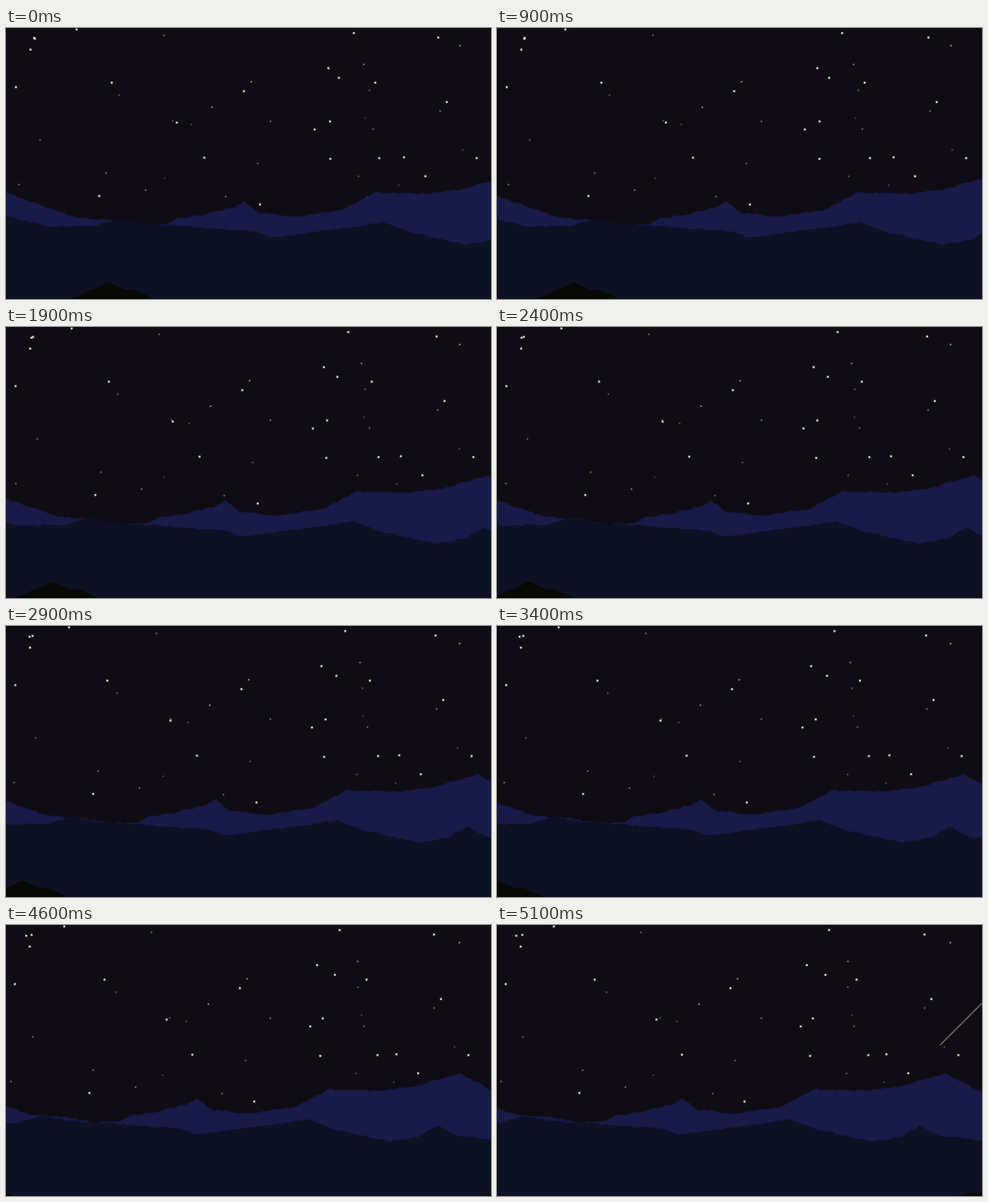
Recreate the animation shown at these times as an HTML page with a canvas. Size 600x336 px, loop 5.2 s.

```html
<!DOCTYPE html>
<html lang="en">
<head>
<meta charset="utf-8">
<title>Night sky</title>
<style>
  html, body { margin: 0; width: 100%; height: 100%; overflow: hidden; background: #100c14; }
  canvas { display: block; }
</style>
</head>
<body>
<canvas id="sky" width="600" height="336"></canvas>
<script>
const W = 600, H = 336, LOOP = 5200, STEP = 100, SPAN = LOOP - STEP;
const ctx = document.getElementById('sky').getContext('2d');

// Repeatable noise from 0 to 1.
const noise = n => {
  const v = Math.sin(n * 127.1) * 43758.5453;
  return v - Math.floor(v);
};

// The brightest stars: x, y and leftward drift over one loop.
const brightStars = [
  [35.5, 13, 12], [34.5, 12, 3.5], [30, 26.5, 1], [87, 1.5, 17], [430, 6, 19.5],
  [534.5, 11.5, 6], [130.5, 67.5, 10], [12, 73, 1.5], [294, 78, 5.5], [545, 91.5, 8],
  [398.5, 49.5, 15.5], [411.5, 61.5, 5.5], [456.5, 67.5, 12], [400.5, 115.5, 10],
  [211, 117, 14], [381.5, 125.5, 6], [245, 160.5, 16.5], [401, 162, 14],
  [461.5, 161, 2.5], [492, 160, 10.5], [582, 161, 11.5], [518.5, 183.5, 10],
  [115, 208, 13.5], [314, 218.5, 8]
].map(([x, y, drift]) => ({ x, y, drift, size: 2, alpha: 0.85 }));

const faintStars = Array.from({ length: 24 }, (_, i) => ({
  x: noise(i + 1) * W,
  y: noise(i + 40) * 235,
  drift: noise(i + 80) * 18,
  size: 1.4,
  alpha: 0.2 + noise(i + 120) * 0.4
}));

const stars = brightStars.concat(faintStars);

// Key points of each ridge, far to near; shift is the scroll over one loop.
const ridges = [
  { color: '#181a48', shift: 65, points: [
    [0, 204], [45, 221], [86, 235], [130, 238], [163, 245], [200, 243], [212, 236],
    [245, 232], [283, 222], [294, 215], [312, 229], [360, 234], [415, 226], [456, 204],
    [523, 206], [565, 200], [619, 184], [670, 210]
  ] },
  { color: '#0e1123', shift: 105, points: [
    [0, 233], [50, 246], [110, 246], [138, 237], [170, 243], [310, 253], [330, 260],
    [430, 247], [467, 241], [495, 252], [567, 269], [605, 263], [628, 249], [650, 261],
    [715, 270]
  ] },
  { color: '#080805', shift: 193, points: [
    [78, 337], [112, 323], [127, 316], [145, 324], [163, 327], [195, 342],
    [750, 342], [775, 333], [800, 332]
  ] }
];

// Breaks each slope into short, slightly rough pieces.
function roughen(points) {
  const line = [points[0]];
  for (let i = 1; i < points.length; i++) {
    const [x0, y0] = points[i - 1], [x1, y1] = points[i];
    const parts = Math.ceil((x1 - x0) / 5);
    for (let k = 1; k <= parts; k++) {
      const f = k / parts, x = x0 + (x1 - x0) * f;
      const bump = k < parts ? (noise(x) - 0.5) * 2.2 : 0;
      line.push([x, y0 + (y1 - y0) * f + bump]);
    }
  }
  return line;
}
ridges.forEach(r => { r.line = roughen(r.points); });

function drawStar({ x, y, drift, size, alpha }, progress) {
  const cx = x - drift * progress + 0.3, cy = y + 0.3;
  const square = (side, opacity) => {
    ctx.globalAlpha = opacity;
    ctx.fillRect(cx - side / 2, cy - side / 2, side, side);
  };
  square(size + 1.2, alpha * 0.3);
  square(size, alpha);
  ctx.globalAlpha = 1;
}

function drawMeteor(t) {
  const ahead = (SPAN - t) * 0.75, length = 75;
  const x = 548 + ahead, y = 149 - ahead;
  ctx.strokeStyle = 'rgba(255,255,255,0.4)';
  ctx.lineWidth = 1.5;
  ctx.beginPath();
  ctx.moveTo(x, y);
  ctx.lineTo(x + length, y - length);
  ctx.stroke();
}

function drawRidge({ color, shift, line }, progress) {
  const offset = shift * progress;
  const first = line[0][0] - offset, last = line[line.length - 1][0] - offset;
  ctx.beginPath();
  ctx.moveTo(first, H + 20);
  for (const [x, y] of line) ctx.lineTo(x - offset, y);
  ctx.lineTo(last, H + 20);
  ctx.fillStyle = ctx.strokeStyle = color;
  ctx.fill();
  // A faint outline softens the edge.
  ctx.globalAlpha = 0.4;
  ctx.lineWidth = 1.6;
  ctx.stroke();
  ctx.globalAlpha = 1;
}

function draw(now) {
  const t = Math.floor((now % LOOP) / STEP) * STEP;
  const linear = t / SPAN;
  const progress = linear * (0.93 + 0.07 * linear);
  ctx.fillStyle = '#100c14';
  ctx.fillRect(0, 0, W, H);
  ctx.fillStyle = '#fff';
  stars.forEach(s => drawStar(s, progress));
  drawMeteor(t);
  ridges.forEach(r => drawRidge(r, progress));
}

let start = null;
function tick(now) {
  if (start === null) start = now;
  draw(Math.max(0, now - start));
  requestAnimationFrame(tick);
}
draw(0);
requestAnimationFrame(tick);
</script>
</body>
</html>
```
